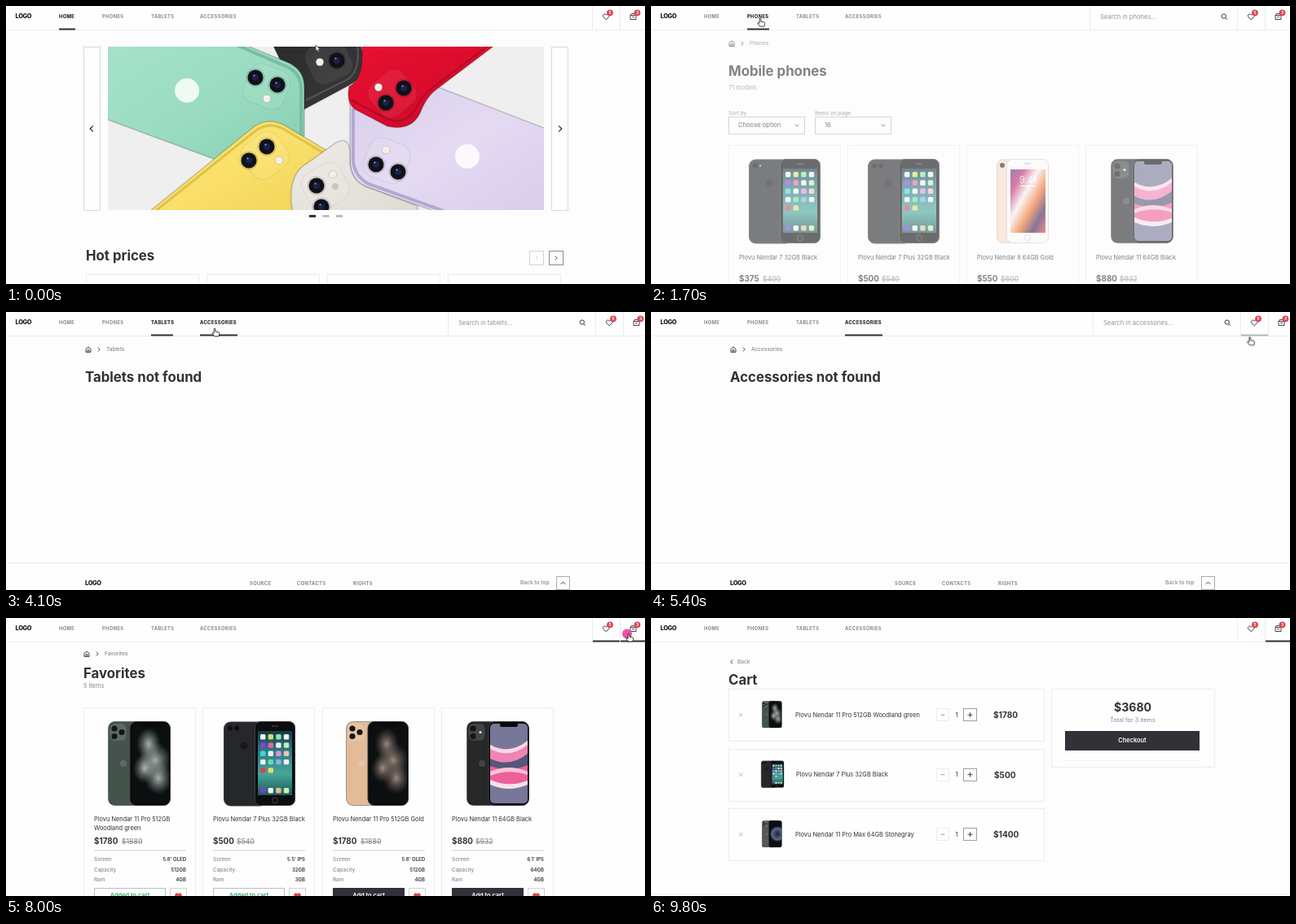
An HTML page that plays this animation: 784 by 342 pixels, repeating every 10 s.

```html
<!DOCTYPE html>
<html lang="en">
<head>
<meta charset="utf-8">
<title>Shop walkthrough</title>
<style>
html, body { margin: 0; width: 784px; height: 342px; overflow: hidden; background: #fdfdfd; }
svg { display: block; }
text { font-family: Inter, sans-serif; white-space: pre; }
.nav { font-size: 5.8px; font-weight: 700; letter-spacing: .36px; }
.a { animation: 10s linear infinite; }

@keyframes home { 0%, 14% { opacity: 1 } 14.01%, 100% { opacity: 0 } }
@keyframes phones { 0%, 14% { opacity: 0 } 19%, 33.5% { opacity: 1 } 33.51%, 100% { opacity: 0 } }
@keyframes tablets { 0%, 33.5% { opacity: 0 } 38%, 44.5% { opacity: 1 } 44.51%, 100% { opacity: 0 } }
@keyframes accessories { 0%, 44.5% { opacity: 0 } 49%, 61.5% { opacity: 1 } 61.51%, 100% { opacity: 0 } }
@keyframes favorites { 0%, 61.5% { opacity: 0 } 64% { opacity: .45 } 67%, 81.5% { opacity: 1 } 81.51%, 100% { opacity: 0 } }
@keyframes cart { 0%, 81.5% { opacity: 0 } 86%, 100% { opacity: 1 } }

@keyframes nav-home { 0%, 14% { opacity: 1 } 16%, 100% { opacity: 0 } }
@keyframes nav-phones { 0%, 10% { opacity: 0 } 12%, 33.5% { opacity: 1 } 36%, 100% { opacity: 0 } }
@keyframes nav-tablets { 0%, 26% { opacity: 0 } 29%, 44.5% { opacity: 1 } 47%, 100% { opacity: 0 } }
@keyframes nav-accessories { 0%, 38% { opacity: 0 } 41%, 61.5% { opacity: 1 } 63%, 100% { opacity: 0 } }
@keyframes nav-favorites { 0%, 53% { opacity: 0 } 56%, 81.5% { opacity: 1 } 84%, 100% { opacity: 0 } }
@keyframes nav-cart { 0%, 72% { opacity: 0 } 75%, 100% { opacity: 1 } }

@keyframes search { 0%, 14% { opacity: 0 } 14.01%, 61.5% { opacity: 1 } 61.51%, 100% { opacity: 0 } }
@keyframes shift { 0%, 33.5% { transform: none } 33.51%, 61.5% { transform: translate(4px) } 61.51%, 100% { transform: none } }
@keyframes hint-phones { 0%, 14% { opacity: 0 } 14.01%, 33.5% { opacity: 1 } 33.51%, 100% { opacity: 0 } }
@keyframes hint-tablets { 0%, 33.5% { opacity: 0 } 33.51%, 44.5% { opacity: 1 } 44.51%, 100% { opacity: 0 } }
@keyframes hint-accessories { 0%, 44.5% { opacity: 0 } 44.51%, 100% { opacity: 1 } }

@keyframes move {
  0%, 1% { transform: translate(380px, 48px) }
  11%, 15% { transform: translate(131px, 13px) }
  22%, 23% { transform: translate(141px, 20px) }
  29%, 36% { transform: translate(191px, 17px) }
  41%, 46% { transform: translate(256px, 20px) }
  50% { transform: translate(500px, 110px) }
  53% { transform: translate(738px, 38px) }
  56%, 71% { transform: translate(728px, 16px) }
  75%, 100% { transform: translate(764px, 19px) }
}
@keyframes leave { 0%, 90% { opacity: 1 } 94%, 100% { opacity: 0 } }
@keyframes arrow { 0%, 10% { opacity: 1 } 10.01%, 47% { opacity: 0 } 47.01%, 54% { opacity: 1 } 54.01%, 100% { opacity: 0 } }
@keyframes hand { 0%, 10% { opacity: 0 } 10.01%, 47% { opacity: 1 } 47.01%, 54% { opacity: 0 } 54.01%, 100% { opacity: 1 } }
@keyframes click {
  0%, 11.9% { opacity: 0 } 12%, 13.2% { opacity: .95 } 15%, 31.9% { opacity: 0 }
  32%, 33.2% { opacity: .95 } 35%, 42.9% { opacity: 0 } 43%, 44.2% { opacity: .95 } 46%, 59.9% { opacity: 0 }
  60%, 61.2% { opacity: .95 } 63%, 79.9% { opacity: 0 } 80%, 81.2% { opacity: .95 } 83%, 100% { opacity: 0 }
}
</style>
</head>
<body>
<svg id="stage" width="784" height="342" viewBox="0 0 784 342"></svg>
<script>
const INK = '#313237', GREY = '#85898d', PALE = '#ececec', RED = '#dc4550';
const BRAND = 'Plovu Nendar ';

const text = (x, y, s, size = 7.4, weight = 400, fill = INK, extra = '') =>
  `<text x="${x}" y="${y}" font-size="${size}" font-weight="${weight}" fill="${fill}" ${extra}>${s}</text>`;
const rect = (x, y, w, h, fill = 'none', stroke = 'none', r = 0) =>
  `<rect x="${x}" y="${y}" width="${w}" height="${h}" rx="${r}" fill="${fill}" stroke="${stroke}"/>`;
const box = (x, y, w, h, stroke = PALE) => rect(x + .5, y + .5, w - 1, h - 1, '#fefefe', stroke);
const circle = (x, y, r, fill, extra = '') => `<circle cx="${x}" cy="${y}" r="${r}" fill="${fill}" ${extra}/>`;
const path = (d, fill, extra = '') => `<path d="${d}" fill="${fill}" ${extra}/>`;
const stroke = (d, color = INK, w = 1) => path(d, 'none', `stroke="${color}" stroke-width="${w}"`);
const at = (x, y, s, k = 1) => `<g transform="translate(${x} ${y}) scale(${k})">${s}</g>`;
const anim = (name, s) => `<g class="a" style="animation-name:${name}">${s}</g>`;
const title = (x, y, s) => text(x, y, s, 16.8, 700);
const END = 'text-anchor="end"', MID = 'text-anchor="middle"';
const logo = (x, y) => text(x, y, 'LOGO', 7.5, 800, '#1c1c1e', 'letter-spacing="-.4"');
const nav = (x, y, s, fill = GREY) => `<text class="nav" x="${x}" y="${y}" fill="${fill}">${s}</text>`;

const chevron = (x, y, dir, color = INK, k = 1) =>
  `<path transform="translate(${x} ${y}) rotate(${dir}) scale(${k})" d="M-1.5-3L1.5 0L-1.5 3" fill="none" stroke="${color}" stroke-width="1.1"/>`;
const heart = (x, y, fill, line) =>
  at(x, y, path('M0 3.6L-3.4.3C-5-1.6-2.4-4.8 0-2.2C2.4-4.8 5-1.6 3.4.3Z', fill, `stroke="${line}"`));
const crumbs = (x, y, s) =>
  at(x + 4, y, stroke('M-3-.6L0-3L3-.6V3.4H-3ZM-1 3.4V.8H1V3.4', INK, .9)) +
  chevron(x + 17, y, 0, INK, .8) + text(x + 26, y + 2.2, s, 6.5, 500, GREY);

const grad = (id, stops, dir = 'x2="0" y2="1"') =>
  `<linearGradient id="${id}" ${dir}>${stops.map((c, i) =>
    `<stop offset="${i / (stops.length - 1)}" stop-color="${c}"/>`).join('')}</linearGradient>`;
const DIAG = 'x2="1" y2="1"';
const defs = `<defs>
  ${grad('mint', ['#a6e2cb', '#9adcc1', '#86cdb0'], DIAG)}${grad('coal', ['#2a2a2c', '#3a3a3c'], DIAG)}
  ${grad('red', ['#e8112f', '#dc0c2d', '#b80824'], DIAG)}${grad('lilac', ['#dacfec', '#e4daf2', '#d9cdea'], DIAG)}
  ${grad('lemon', ['#fbe67a', '#fae06a', '#efd257'], DIAG)}${grad('cream', ['#eeebe6', '#dfdbd4'], DIAG)}
  ${grad('sea', ['#173b48', '#2f7d87', '#46a59a', '#1c5a55'])}
  ${grad('paint', ['#5b2a86', '#c5286b', '#f6f1f3', '#f2722b', '#3a1b58', '#e53f36'], DIAG)}
  <radialGradient id="mist"><stop offset="0" stop-color="#dfe5e2"/><stop offset="1" stop-color="#9fb0ad" stop-opacity="0"/></radialGradient>
  <radialGradient id="dust"><stop offset="0" stop-color="#c9b3a6"/><stop offset="1" stop-color="#7a655c" stop-opacity="0"/></radialGradient>
  <radialGradient id="globe"><stop offset="0" stop-color="#1b2132"/><stop offset=".7" stop-color="#5f6d8c"/><stop offset="1" stop-color="#10131b" stop-opacity="0"/></radialGradient>
  <clipPath id="glass">${rect(29, 3, 46, 98, '#000', 'none', 5)}</clipPath>
</defs>`;

// Product pictures: all 104 high, back half-hidden behind the front.
const icons = () => {
  let s = '';
  for (let i = 0; i < 24; i++) {
    const row = i >> 2, last = row === 5;
    if (row === 4 && i % 4 > 1) continue;
    s += rect(45 + (i % 4) * 9.6, last ? 82 : 16 + row * 10.3, 6.4, 6.4,
      i % 3 ? `hsl(${i * 67 % 360} 65% ${55 + i % 4 * 9}%)` : '#f1f2f2', 'none', 1.5);
  }
  return s;
};
const classic = lenses =>
  rect(.5, 1, 53, 103, '#26272a', '#3b3c40', 8) +
  circle(8, 8.5, 3, '#0e0f11') + (lenses > 1 ? circle(16, 8.5, 3, '#0e0f11') : circle(14, 8.5, 1, '#ddd')) +
  circle(25, 30, 4.5, '#17181a') + rect(38.5, .5, 49, 103, '#0c0d0f', '#3a3b3e', 7) +
  rect(42, 12, 42, 79, 'url(#sea)') + icons() + stroke('M59 6H67', '#555') +
  circle(63, 97.3, 3.5, 'none', 'stroke="#555" stroke-width=".8"');
const golden = () =>
  rect(.5, 1, 45, 102, '#f4dcca', '#dfbfa9', 7) + circle(7, 8, 3, '#2e2a2a') +
  rect(12.5, .5, 51, 103, '#fbfaf9', '#e2c8b8', 7) + rect(17, 13, 43, 78, 'url(#paint)') +
  text(38.5, 30, '9:41', 11, 300, '#fff', MID) + rect(29, 33, 19, 1, '#fff') +
  circle(38, 97, 3.5, 'none', 'stroke="#d9c0b0" stroke-width=".8"') + stroke('M34 6H42', '#aaa');
const full = (back, wall, triple = true) =>
  rect(.5, .5, 49, 103, back, '#00000055', 8) + rect(2.5, 3, 20, 21, '#ffffff22', 'none', 6) +
  circle(8, 9, 3.6, '#141516') + circle(8, 18.5, 3.6, '#141516') +
  (triple ? circle(17, 13.5, 3.6, '#141516') : circle(17, 13.5, 1.6, '#ddd')) +
  circle(19, 52, 4, '#ffffff22') +
  rect(27, .5, 49.5, 103, '#08090a', '#3c3d3f', 8) + `<g clip-path="url(#glass)">${wall}</g>` +
  rect(41, 2.5, 22, 4.5, '#08090a', 'none', 2);
const cloud = fill => rect(29, 3, 46, 98, '#0b0f10') +
  [[50, 28, 15, 20], [58, 48, 20, 22], [45, 58, 14, 18], [62, 70, 17, 20]].map(([x, y, a, b]) =>
    `<ellipse cx="${x}" cy="${y}" rx="${a}" ry="${b}" fill="url(#${fill})" opacity=".75"/>`).join('');
const waves = rect(29, 3, 46, 98, '#77779a') +
  path('M29 29Q52 42 75 24V40Q52 58 29 46Z', '#f084b5') + path('M29 29Q52 42 75 24V29Q52 47 29 34Z', '#f8d7e4') +
  path('M29 46Q52 58 75 40V54Q52 64 29 55Z', '#55567a') + path('M29 55Q52 64 75 54V73Q52 82 29 72Z', '#ee5f9b') +
  path('M29 62Q52 52 75 62V66Q52 58 29 67Z', '#f9c3d7') + path('M29 72Q52 82 75 73V78Q52 88 29 78Z', '#f5e3ea');
const pic = {
  one: classic(1), two: classic(2), gold8: golden(),
  green: full('#45534d', cloud('mist')), gold: full('#e3bb98', cloud('dust')),
  black: full('#252729', waves, false),
  gray: full('#55575a', rect(29, 3, 46, 98, '#0c0e14') + circle(60, 52, 32, 'url(#globe)'))
};

const lens = (x, y) => circle(x, y, 11.5, '#0002') + circle(x, y, 9.5, '#101118') + circle(x, y, 4, '#1a214a') + circle(x - 1.5, y - 2.5, 1, '#9aa6d8');
const flash = (x, y) => circle(x, y, 4.8, '#f6efe8', 'stroke="#0002"');
const bump = (x, y, deg) => `<rect x="-26" y="-25" width="52" height="50" rx="15" transform="translate(${x} ${y}) rotate(${deg})" fill="#fff1" stroke="#0001"/>`;
const edge = 'stroke="#0003" stroke-width="1.5"';
const hero = `<svg x="125" y="50" width="535" height="201" viewBox="125 50 535 201">
  ${rect(125, 50, 535, 201, '#f0efef')}
  ${path('M326 45H434Q441 66 437 80Q434 91 420 98L366 127Z', 'url(#coal)', edge)}${stroke('M431 48Q435 78 420 90L368 116', '#555558', 2)}
  ${bump(396, 68, -25)}${lens(406, 67)}${flash(385, 69)}
  ${path('M528 99L665 152V255H533L441 222Q423 214 422 192V118Z', 'url(#lilac)', edge)}
  ${stroke('M426 126V190Q427 209 445 219L545 255', '#b5a8cf', 4)}${bump(467, 190, 20)}${lens(454, 195)}${lens(481, 204)}${flash(466, 177)}${circle(566, 185, 15, '#fbf9fd')}
  ${path('M436 45H604L525 105Q516 113 510 127Q500 155 468 148L428 127Q417 119 421 99Q441 88 436 45Z', 'url(#red)', edge)}
  ${stroke('M424 116L468 139Q490 147 503 126Q509 112 520 103L590 50', '#b00a26', 2)}${bump(474, 108, -40)}${lens(488, 101)}${lens(466, 119)}${flash(457, 100)}
  ${path('M120 45H287L347 70Q366 79 366 100V160L300 205L120 138Z', 'url(#mint)', edge)}
  ${stroke('M283 48L343 74Q362 82 362 102V160', '#79bda3', 4)}${bump(320, 99, 20)}${lens(306, 88)}${lens(333, 97)}${flash(320, 114)}${circle(222, 104, 15, '#effaf5')}
  ${path('M172 256L300 152Q319 135 342 147L396 179L350 256Z', 'url(#lemon)', edge)}
  ${stroke('M180 255L303 156Q320 141 340 151L390 181', '#dfc24c', 3)}${bump(318, 184, -38)}${lens(320, 173)}${lens(298, 190)}${flash(335, 190)}
  ${path('M352 256Q343 208 370 193L405 168Q420 160 422 178V192Q423 214 441 222L505 246V256Z', 'url(#cream)', edge)}
  ${bump(392, 222, -30)}${lens(381, 221)}${lens(387, 247)}${flash(401, 207)}${circle(404, 222, 4, '#c9c4bb')}
</svg>`;

const home = hero +
  box(95, 50, 21, 202, '#dadada') + chevron(105, 151, 180, INK, 1.2) +
  box(669, 50, 21, 202, '#dadada') + chevron(680, 151, 0, INK, 1.2) +
  [372, 388.5, 405].map((x, i) => rect(x, 257, 8, 3, i ? '#bdbdbd' : INK)).join('') +
  title(98, 313, 'Hot prices') +
  box(642, 301, 18, 18, '#d2d2d2') + chevron(651, 310, 180, '#c4c4c4', .8) +
  box(666, 301, 18, 18, '#8b8b8e') + chevron(675, 310, 0, INK, .8) +
  [98, 246, 394, 542].map(x => box(x, 330, 139, 60)).join('');

const price = (x, y, now, old) => text(x, y, '$' + now, 9.9, 700) +
  text(x + (now > 999 ? 34 : 29), y, '$' + old, 8.6, 500, '#8b8f93', 'text-decoration="line-through"');
const select = (x, label, value) => text(x, 134, label, 6.5, 500, GREY) +
  box(x, 136, 94, 22, '#b9bdc2') + text(x + 12, 149.3, value, 7.6) + chevron(x + 84, 147, 90, INK, .8);

const phones = crumbs(95, 46, 'Phones') + title(95, 86, 'Mobile phones') + text(95, 103.3, '71 models', 7.4, 400, GREY) +
  select(95, 'Sort by', 'Choose option') + select(201, 'Items on page', '16') +
  [['7 32GB Black', 375, 400, 'one', 25], ['7 Plus 32GB Black', 500, 540, 'two', 25],
   ['8 64GB Gold', 550, 600, 'gold8', 37], ['11 64GB Black', 880, 932, 'black', 31]].map(([name, now, old, img, dx], i) => {
    const x = 95 + i * 146;
    return box(x, 171, 138, 200) + at(x + dx, 188, pic[img]) +
      text(x + 13, 312, BRAND + name) + price(x + 13, 339, now, old);
  }).join('');

const missing = name => crumbs(97, 46, name) + title(97, 86, name + ' not found') +
  rect(0, 308, 784, 1, PALE) + logo(97, 336) +
  nav(299, 336, 'SOURCE') + nav(357, 336, 'CONTACTS') + nav(426, 336, 'RIGHTS') +
  text(631, 335, 'Back to top', 6.6, 500, GREY) + box(675, 325, 17, 17, '#a9adb1') + chevron(683.5, 333.5, -90, INK, .9);

const favorites = crumbs(95, 44, 'Favorites') + title(95, 74, 'Favorites') + text(95, 86, '5 items', 7.4, 400, GREY) +
  [['11 Pro 512GB', 1780, 1880, 'green', 30, "5.8' OLED", '512GB', '4GB', 'Woodland green'],
   ['7 Plus 32GB Black', 500, 540, 'two', 26, "5.5' IPS", '32GB', '3GB'],
   ['11 Pro 512GB Gold', 1780, 1880, 'gold', 29, "5.8' OLED", '512GB', '4GB'],
   ['11 64GB Black', 880, 932, 'black', 31, "6.1' IPS", '64GB', '4GB']].map(([name, now, old, img, dx, screen, size, ram, more], i) => {
    const x = 95 + Math.round(i * 146.4), l = x + 13, r = x + 126, added = i < 2;
    return box(x, 110, 138, 260) + at(x + dx, 127, pic[img]) +
      text(l, 250, BRAND + name) + (more ? text(l, 260.5, more) : '') + price(l, 278, now, old) +
      rect(l, 285.5, 113, 1, '#cfd1d4') +
      [['Screen', screen], ['Capacity', size], ['Ram', ram]].map(([k, v], n) =>
        text(l, 299.3 + n * 12.5, k, 6.4, 500, GREY) + text(r, 299.3 + n * 12.5, v, 6, 600, INK, END)).join('') +
      (added ? box(l, 332, 88, 21, '#b9bdc2') : rect(l, 332, 88, 21, INK)) +
      text(l + 44, 344, added ? 'Added to cart' : 'Add to cart', 7.4, 600, added ? '#35a866' : '#fff', MID) +
      box(r - 20, 332, 21, 21, '#cfd1d4') + heart(r - 9.5, 342, RED, RED);
  }).join('');

const cart = chevron(99, 54, 180, INK, .8) + text(106, 55.5, 'Back', 6.5, 500, GREY) + title(95, 82, 'Cart') +
  [['11 Pro 512GB Woodland green', 1780, 'green', 136], ['7 Plus 32GB Black', 500, 'two', 135],
   ['11 Pro Max 64GB Stonegray', 1400, 'gray', 136]].map(([name, cost, img, px], i) => {
    const y = 87 + i * 73.5, dx = i === 1 ? 1 : 0, m = y + 32;
    return box(95, Math.round(y), 388, 65) + stroke(`M108 ${m - 2}l4.5 4.5m0-4.5l-4.5 4.5`, '#a9adb1', .8) +
      at(px, y + 15, pic[img], .32) + text(177 + dx, m + 2.7, BRAND + name) +
      box(350, Math.round(y) + 24, 16, 16) + stroke(`M355.5 ${m + .2}h5`, '#8b8f93', .9) +
      text(375, m + 2.6, '1', 7.4, 400, INK, MID) +
      box(383, Math.round(y) + 24, 17, 16, '#9b9ea2') + stroke(`M388.5 ${m + .2}h6m-3-3v6`, INK, .9) +
      text(420 + dx, m + 4, '$' + cost, 10.1, 700);
  }).join('') +
  box(491, 87, 201, 97) + text(591, 115, '$3680', 14.1, 700, INK, MID) +
  text(591, 128, 'Total for 3 items', 7.3, 400, GREY, MID) +
  rect(508, 139, 165, 24, INK) + text(590.5, 153.3, 'Checkout', 7.4, 600, '#fff', MID) +
  rect(508, 175, 165, 1, '#f2f2f2') + rect(0, 339, 784, 1, PALE);

const navItem = (name, x, w) => nav(x, 15.2, name.toUpperCase()) +
  anim('nav-' + name, nav(x, 15.2, name.toUpperCase(), INK) + rect(x, 27.5, w, 2, INK));
const badge = (x, n) => circle(x, 8.3, 3.9, RED) + text(x, 10.2, n, 5, 700, '#fff', MID);
const hint = name => anim('hint-' + name, text(551, 15.8, `Search in ${name}...`, 7.6, 400, '#8f9498'));
const header = rect(0, 0, 784, 29, '#fefefe') + rect(0, 29, 784, 1, PALE) + logo(11.5, 14.5) +
  navItem('home', 65, 20) + navItem('phones', 118, 27) + navItem('tablets', 178, 27) + navItem('accessories', 238, 46) +
  anim('shift',
    anim('search', rect(538, 0, 1, 29, PALE) + ['phones', 'tablets', 'accessories'].map(hint).join('') +
      circle(702.8, 12.6, 2.7, 'none', `stroke="${INK}"`) + stroke('M704.8 14.6L707 16.8')) +
    rect(719, 0, 1, 29, PALE) + rect(753, 0, 1, 29, PALE) +
    anim('nav-favorites', rect(720, 27.5, 33, 2, INK)) + anim('nav-cart', rect(754, 27.5, 33, 2, INK)) +
    heart(736.3, 13.2, 'none', INK) + badge(741, 5) +
    stroke('M766 11.5L767.2 9.5H771.8L773 11.5V16.5H766ZM766 11.5H773M768 13Q769.5 15 771 13', INK, .9) + badge(774.5, 3));

const cursor = anim('leave', anim('move',
  anim('click', circle(-2, .5, 6, '#f545a6')) +
  anim('arrow', path('M0 0V7.6L1.8 6L3 8.8L4.4 8.2L3.2 5.5H5.6Z', '#fff', 'stroke="#222" stroke-width=".7"')) +
  anim('hand', path('M-.9 .8Q0-.8 .9 .8V4L5 5Q6 5.4 5.8 6.6L5 10H-.2L-3 6.6Q-3 5.2-1.8 5.6L-.9 6.4Z', '#fff', 'stroke="#222" stroke-width=".9" stroke-linejoin="round"'))));

const scenes = { home, phones, tablets: missing('Tablets'), accessories: missing('Accessories'), favorites, cart };
document.getElementById('stage').innerHTML = defs +
  Object.entries(scenes).map(([name, s]) => anim(name, s)).join('') + header + cursor;
</script>
</body>
</html>
```
